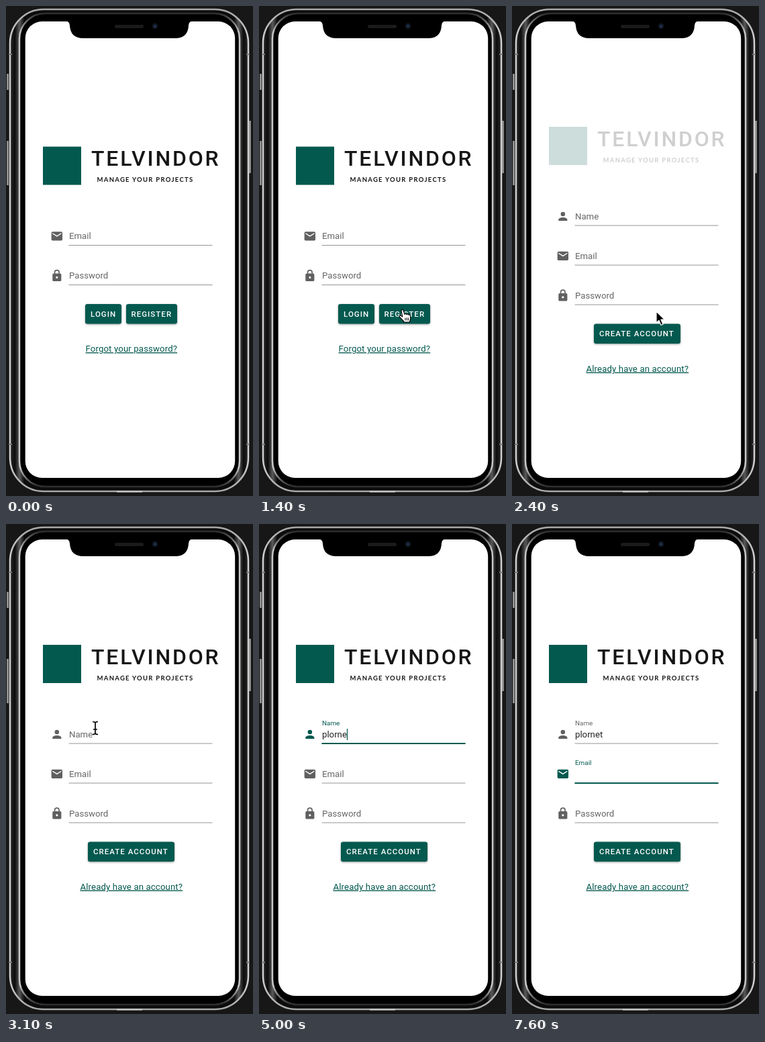
Animation of 368x730 px, one loop 8000 ms. Source, as an HTML page:

```html
<!DOCTYPE html>
<html lang="en">
<head>
<meta charset="utf-8">
<title>Sign up</title>
<style>
  html, body { margin: 0; width: 100%; height: 100%; overflow: hidden; background: #171717; }
  svg { display: block; width: 100%; height: 100%; font: 13.2px Roboto, sans-serif; }
  .teal { fill: #04594f; }
  .link { fill: #04594f; text-decoration: underline; letter-spacing: .01em; }
  .button rect { fill: #04594f; filter: drop-shadow(0 1.5px 1.5px #0006); }
  .button text { fill: #fff; font-size: 11.5px; font-weight: 500; letter-spacing: .0893em; }
  .word { font-size: 32px; font-weight: 500; letter-spacing: 2.8px; fill: #161616; }
  .tag { font: 700 9.5px Lato, sans-serif; letter-spacing: 1.28px; fill: #161616; }
  .menu text { font: 14.8px Inter, sans-serif; fill: #111; }
  .menu rect { fill: #fff; stroke: #bbb; stroke-width: .7; filter: drop-shadow(0 3px 6px #0006); }
</style>
</head>
<body>
<svg viewBox="0 0 368 730">
  <defs>
    <linearGradient id="rim" x2="1">
      <stop offset="0" stop-color="#2a2a2a"/><stop offset=".02" stop-color="#0c0c0c"/>
      <stop offset=".04" stop-color="#5a5a5a"/><stop offset=".06" stop-color="#0c0c0c"/>
      <stop offset=".94" stop-color="#0c0c0c"/><stop offset=".96" stop-color="#5a5a5a"/>
      <stop offset=".98" stop-color="#0c0c0c"/><stop offset="1" stop-color="#2a2a2a"/>
    </linearGradient>
    <linearGradient id="shine" x2="0" y2="1">
      <stop offset="0" stop-color="#a8a8a8"/><stop offset=".06" stop-color="#d0d0d0"/>
      <stop offset=".94" stop-color="#d0d0d0"/><stop offset="1" stop-color="#a8a8a8"/>
    </linearGradient>
    <linearGradient id="edge" x2="0" y2="1">
      <stop offset="0" stop-color="#2c2c2c"/><stop offset=".04" stop-color="#c8c8c8"/>
      <stop offset=".96" stop-color="#c8c8c8"/><stop offset="1" stop-color="#2c2c2c"/>
    </linearGradient>
  </defs>

  <g id="phone">
    <path d="M2.5 101V125M2.5 201V267M363.5 171V249" stroke="#a0a0a0" stroke-width="2.5"/>
    <rect x="6" y="5" width="355" height="718" rx="50" fill="url(#rim)" stroke="url(#shine)" stroke-width="2.5"/>
    <rect x="20" y="11" width="328" height="705" rx="38" fill="#000" stroke="url(#edge)" stroke-width="2.5"/>
    <path d="M4 72H9M358 72H363M4 653H9M358 653H363" stroke="#777" stroke-width="2"/>
    <path d="M165 723.5H203" stroke="#ccc" stroke-width="2"/>
    <rect x="28.7" y="23" width="312.5" height="680" rx="25" fill="#fff"/>
    <path d="M88 22Q95 23 95 29Q96 48 115 48H252Q271 48 272 29Q272 23 279 22Z"/>
    <rect x="162" y="28" width="43" height="5" rx="2.5" fill="#1b1b1b"/>
    <circle cx="222" cy="30" r="4.5" fill="#10141c"/><circle cx="222" cy="30" r="2" fill="#1d3558"/>
  </g>

  <g id="brand">
    <rect class="teal" x="55" y="209.5" width="57" height="57"/>
    <text class="word" x="127" y="238">TELVINDOR</text>
    <text class="tag" x="135.5" y="262">MANAGE YOUR PROJECTS</text>
  </g>

  <g id="fields"></g>

  <g id="login">
    <g class="button"><rect x="118" y="444" width="54" height="29.5" rx="3.3"/><text x="126" y="463">LOGIN</text></g>
    <g class="button"><rect x="179" y="444" width="76" height="29.5" rx="3.3"/><text x="186.5" y="463">REGISTER</text></g>
    <text class="link" x="118.5" y="515">Forgot your password?</text>
  </g>
  <g id="signup">
    <g class="button"><rect x="122" y="473.5" width="129" height="29.5" rx="3.3"/><text x="130" y="492">CREATE ACCOUNT</text></g>
    <text class="link" x="110.5" y="544.7">Already have an account?</text>
  </g>

  <g id="menu" class="menu">
    <rect x="93" y="326" width="213.5" height="51"/>
    <text x="99" y="344.5">Plornet 8</text>
    <text x="99" y="369.5">Plornet One Zero</text>
  </g>

  <g id="pointer" stroke-linejoin="round">
    <path id="arrow" d="M0 0V17L4 13.3L7 20.5L10 19.2L7 12.2H12.5Z" stroke="#fff" stroke-width="1.2"/>
    <g id="hand">
      <path d="M-1.5 1.5C-1.5-.6 1-.6 1.7 1.2L3.6 7C4 5.6 6 5.7 6.4 7.2C7 6 8.8 6.2 9.2 7.7C10 6.8 11.6 7.3 11.9 9L12.3 13Q12 16 10.7 18.5H2.8C1.5 15.5-2.4 13-4.3 10.3C-5 8.5-3 7.7-1.7 9L.3 10.5Z" fill="#fff" stroke="#000" stroke-width="1.2"/>
      <path d="M4.5 12V16M6.8 12V16M9.1 12V16" stroke="#000"/>
    </g>
    <path id="beam" d="M-4-9.5Q0-9.5 0-7Q0-9.5 4-9.5M0-7V7M-3 2H3M-4 9.5Q0 9.5 0 7Q0 9.5 4 9.5" fill="none" stroke="#000" stroke-width="1.7"/>
  </g>
</svg>
<script>
const $ = id => document.getElementById(id);
const LOOP = 8000, STEP = 100;
const icons = {
  Name: 'M12 4a4 4 0 0 1 0 8a4 4 0 0 1 0-8M12 14c4.4 0 8 1.8 8 4v2H4v-2c0-2.2 3.6-4 8-4',
  Email: 'M20 8l-8 5l-8-5V6l8 5l8-5M20 4H4a2 2 0 0 0-2 2v12a2 2 0 0 0 2 2h16a2 2 0 0 0 2-2V6a2 2 0 0 0-2-2',
  Password: 'M12 17a2 2 0 0 0 0-4a2 2 0 0 0 0 4M18 8a2 2 0 0 1 2 2v10a2 2 0 0 1-2 2H6a2 2 0 0 1-2-2V10a2 2 0 0 1 2-2h1V6a5 5 0 0 1 10 0v2h1M12 3a3 3 0 0 0-3 3v2h6V6a3 3 0 0 0-3-3'
};

const clamp = x => Math.max(0, Math.min(1, x));
const easeOut = x => 1 - (1 - clamp(x)) ** 3;
const show = (el, on) => el.setAttribute('display', on ? 'inline' : 'none');
const within = (t, ...spans) => spans.some(([from, to]) => t >= from && t < to);

// Each field is drawn relative to its underline at y = 0.
function makeField(name) {
  const g = document.createElementNS('http://www.w3.org/2000/svg', 'g');
  g.innerHTML = `<path d="${icons[name]}" fill-rule="evenodd" transform="translate(66 -23.5) scale(.82)"/>
    <path d="M93.5 0H307.5" stroke="#949494"/>
    <path d="M-107 0H107" stroke="#04594f" stroke-width="2"/>
    <text>${name}</text><text x="94" y="-9.3" fill="#222"></text>
    <rect class="teal" y="-22" width="1.2" height="17"/>`;
  $('fields').append(g);
  const [icon, , line, label, value, caret] = g.children;
  return {
    g,
    update(y, focus = 0, lift = 0, text = '', blink = false) {
      const tint = grey => `color-mix(in srgb, #04594f ${focus * 100}%, ${grey})`;
      g.setAttribute('transform', `translate(0 ${y})`);
      icon.style.fill = tint('#606060');
      label.style.fill = tint('#666');
      label.setAttribute('transform', `translate(94 ${-9.3 - 18 * lift}) scale(${1 - lift / 4})`);
      line.setAttribute('transform', `translate(200.5 0) scale(${focus} 1)`);
      show(line, focus > 0);
      value.textContent = text;
      caret.setAttribute('x', 94 + (text ? value.getComputedTextLength() : 0));
      show(caret, blink);
    }
  };
}
const [nameField, emailField, passwordField] = Object.keys(icons).map(makeField);

// Pointer stops: time, x, y
const route = [
  [300, 345, 722], [500, 325, 708], [600, 290, 686], [700, 240, 646], [800, 210, 570],
  [900, 212, 475], [1000, 213.5, 452.5], [2200, 213.5, 452.5], [2300, 215, 455], [2700, 215, 455],
  [2800, 190, 422], [2900, 156, 366], [3000, 137, 314], [3100, 133, 304], [4100, 133, 304]
];
function pointerAt(t) {
  const i = route.findIndex(stop => stop[0] > t);
  if (i < 1) return null;
  const [a, b] = [route[i - 1], route[i]], k = (t - a[0]) / (b[0] - a[0]);
  return [a[1] + (b[1] - a[1]) * k, a[2] + (b[2] - a[2]) * k];
}

const typing = [[4600, 1], [4700, 2], [4800, 4], [5000, 6], [5100, 7]];

function draw(t) {
  const signup = t >= 2300;
  show($('login'), !signup);
  show($('signup'), signup);
  show(nameField.g, signup);
  $('brand').setAttribute('transform', `translate(0 ${signup ? -29.5 : 0})`);
  $('brand').setAttribute('opacity', signup ? clamp((t - 2340) / 300) : 1);

  const nameLift = easeOut((t - 3650) / 300), emailLift = easeOut((t - 6950) / 300);
  const typed = typing.reduce((n, [at, count]) => t >= at ? count : n, 0);
  nameField.update(327, nameLift - emailLift, nameLift, 'plornet'.slice(0, typed),
    within(t, [3700, 4200], [4600, 5300], [5800, 6400], [6500, 7000]));
  emailField.update(signup ? 386 : 356.5, emailLift, emailLift, '', within(t, [7000, 7600]));
  passwordField.update(signup ? 445 : 415.5);
  show($('menu'), within(t, [6400, 6500]));

  const at = pointerAt(t);
  show($('pointer'), at);
  if (at) {
    $('pointer').setAttribute('transform', `translate(${at})`);
    const shape = within(t, [900, 2300]) ? 'hand' : t >= 2900 ? 'beam' : 'arrow';
    for (const id of ['hand', 'beam', 'arrow']) show($(id), id === shape);
  }
}

const start = performance.now();
function frame() {
  const t = (performance.now() - start) % LOOP;
  draw(Math.floor(t / STEP) * STEP);
  requestAnimationFrame(frame);
}
frame();
</script>
</body>
</html>
```
